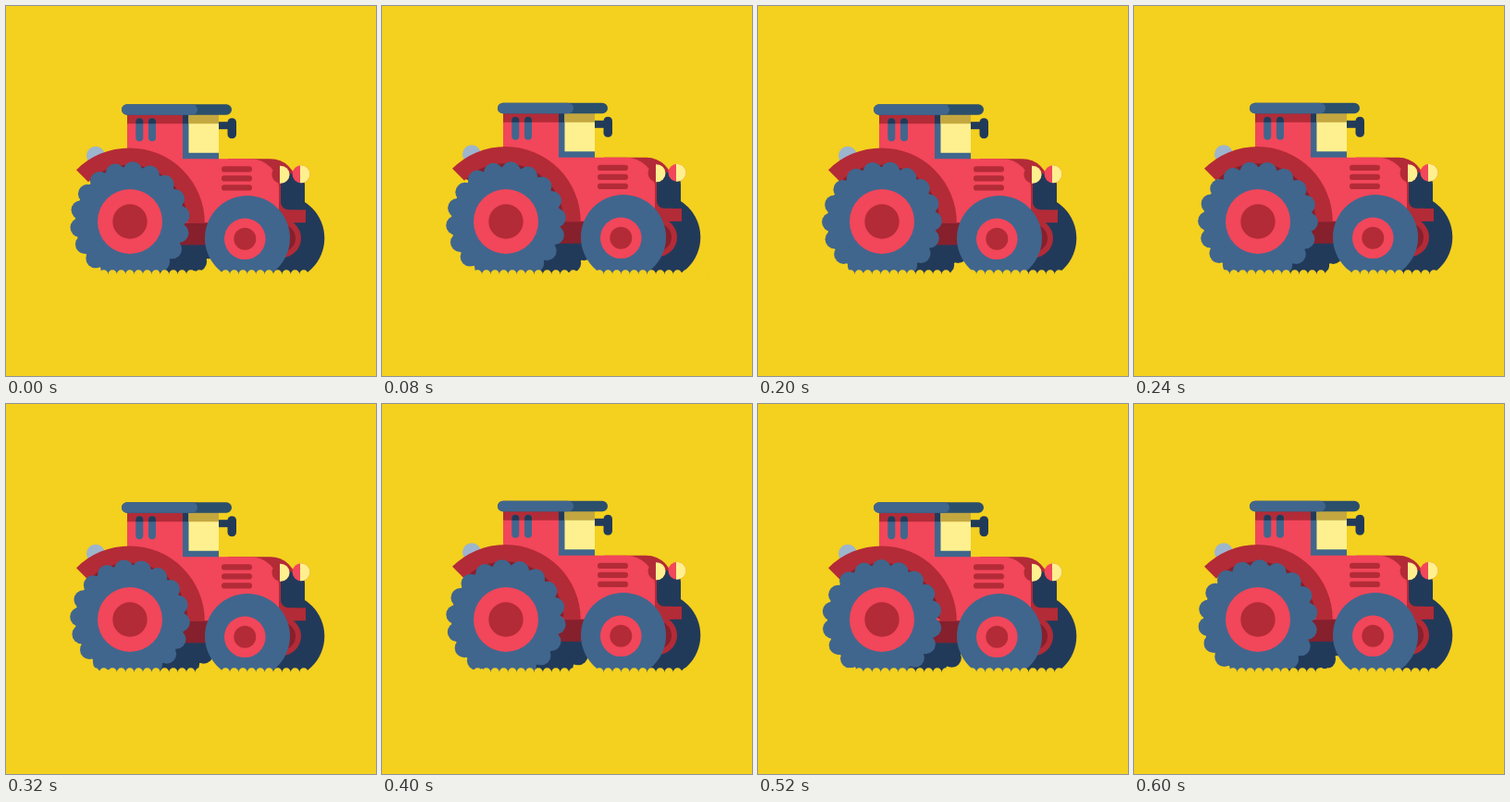
An HTML page with a canvas for the animation above (0.64 s loop, 400 by 400 pixels).

```html
<!DOCTYPE html>
<html lang="en">
<head>
<meta charset="utf-8">
<title>Tractor</title>
<style>
html, body { margin: 0; width: 100%; height: 100%; overflow: hidden; background: #f4d01f; }
canvas { display: block; width: 400px; height: 400px; }
</style>
</head>
<body>
<canvas id="stage" width="400" height="400"></canvas>
<script>
const ctx = document.getElementById('stage').getContext('2d');
const TAU = Math.PI * 2;
const STEP = 40, STEPS = 16;
const LUGS = 18, PITCH = 9.4;
const C = {
  bg: '#f4d01f', red: '#f2465a', dark: '#b32b37', deep: '#86202d',
  blue: '#40668d', navy: '#223a59', slate: '#2b4f6b',
  glass: '#fff08f', shade: '#c4a83f', grey: '#9db5cd'
};

function rect(x0, y0, x1, y1, color, r = 0) {
  ctx.fillStyle = color;
  ctx.beginPath();
  ctx.roundRect(x0, y0, x1 - x0, y1 - y0, r);
  ctx.fill();
}

function disc(x, y, r, color, from = 0, to = TAU) {
  ctx.fillStyle = color;
  ctx.beginPath();
  ctx.arc(x, y, r, from, to);
  ctx.fill();
}

function lugWheel(x, y, turn, color) {
  disc(x, y, 59, color);
  for (let i = 0; i < LUGS; i++) {
    const a = turn + i * TAU / LUGS;
    disc(x + 54.5 * Math.cos(a), y + 54.5 * Math.sin(a), 10.4, color);
  }
}

// The ground is a row of round tops that covers the wheels from below.
function soil(shift) {
  rect(0, 290, 400, 400, C.bg);
  for (let x = shift - 15 * PITCH; x < 400; x += PITCH) {
    disc(x + PITCH / 2, 290, PITCH / 2, C.bg);
  }
}

function lamp(x, y, left) {
  ctx.save();
  disc(x, y, 9.5, left);
  ctx.beginPath();
  ctx.rect(x - 1, y - 10, 12, 20);
  ctx.clip();
  disc(x, y, 9.5, C.glass);
  ctx.restore();
}

function cab() {
  rect(131, 116, 198, 234, C.red);
  rect(131, 116, 191, 127, C.dark);
  for (const x of [140.3, 154]) {
    rect(x, 121, x + 8, 146, C.blue, 4);
    rect(x, 121, x + 8, 127, C.navy, [4, 4, 0, 0]);
  }
  rect(191, 116, 230, 166, C.blue);
  rect(191, 116, 198, 127, C.navy);
  rect(197.5, 116, 230, 158.5, C.glass);
  rect(197.5, 116, 230, 127, C.shade);

  rect(230, 125, 244, 133, C.navy);
  rect(239.5, 121, 249, 143, C.navy, 4.5);

  rect(125, 106, 244, 117.5, C.slate, 5.75);
  rect(125, 106, 207, 117.5, C.blue, 5.75);
}

function bonnet() {
  rect(240, 165, 314, 234, C.dark, [0, 28, 0, 0]);
  rect(191, 165, 295, 234, C.red, [0, 31, 0, 0]);
  for (const y of [173, 183, 193]) rect(233, y, 266, y + 6.3, C.dark, 3.1);
  rect(297, 220, 324, 234, C.dark);
  rect(297, 181, 323, 220, C.navy, [0, 13, 0, 8]);
  lamp(297, 182, C.dark);
  lamp(319, 181.5, C.red);
}

function fender() {
  disc(134, 234, 67, C.deep, Math.PI * 1.25, TAU);
  ctx.fillStyle = C.dark;
  ctx.beginPath();
  ctx.arc(133.5, 234.5, 81.3, Math.PI * 1.25, TAU);
  ctx.arc(133.5, 234.5, 63, TAU, Math.PI * 1.25, true);
  ctx.fill();
}

function draw(step) {
  const turn = (step - 5.5) / STEPS * TAU / LUGS;
  const shift = 110.4 - step * 2 * PITCH / STEPS;
  const up = step % 4 >= 2;

  rect(0, 0, 400, 400, C.bg);
  lugWheel(174, 233, turn, C.navy);

  ctx.save();
  ctx.translate(0, up ? -1 : 0);
  disc(298, 251, 46.3, C.navy);
  disc(298, 251, 21, C.dark);
  disc(298, 251, 15, C.deep);
  ctx.restore();

  ctx.save();
  ctx.translate(0, up ? -1.2 : 0.2);
  disc(97, 161.5, 10, C.grey);
  rect(180, 232, 235, 258, C.deep);
  cab();
  bonnet();
  fender();
  ctx.restore();

  lugWheel(134, 233, turn, C.blue);
  disc(134, 233, 35, C.red);
  disc(134, 233, 18.7, C.dark);

  ctx.save();
  ctx.translate(0, up ? -1 : 0);
  disc(261, 251, 46, C.blue);
  disc(258.3, 251.8, 22.3, C.red);
  disc(258.3, 251.8, 12, C.dark);
  ctx.restore();

  soil(shift);
}

const start = performance.now();
function tick() {
  draw(Math.floor((performance.now() - start) / STEP) % STEPS);
  requestAnimationFrame(tick);
}
tick();
</script>
</body>
</html>
```
